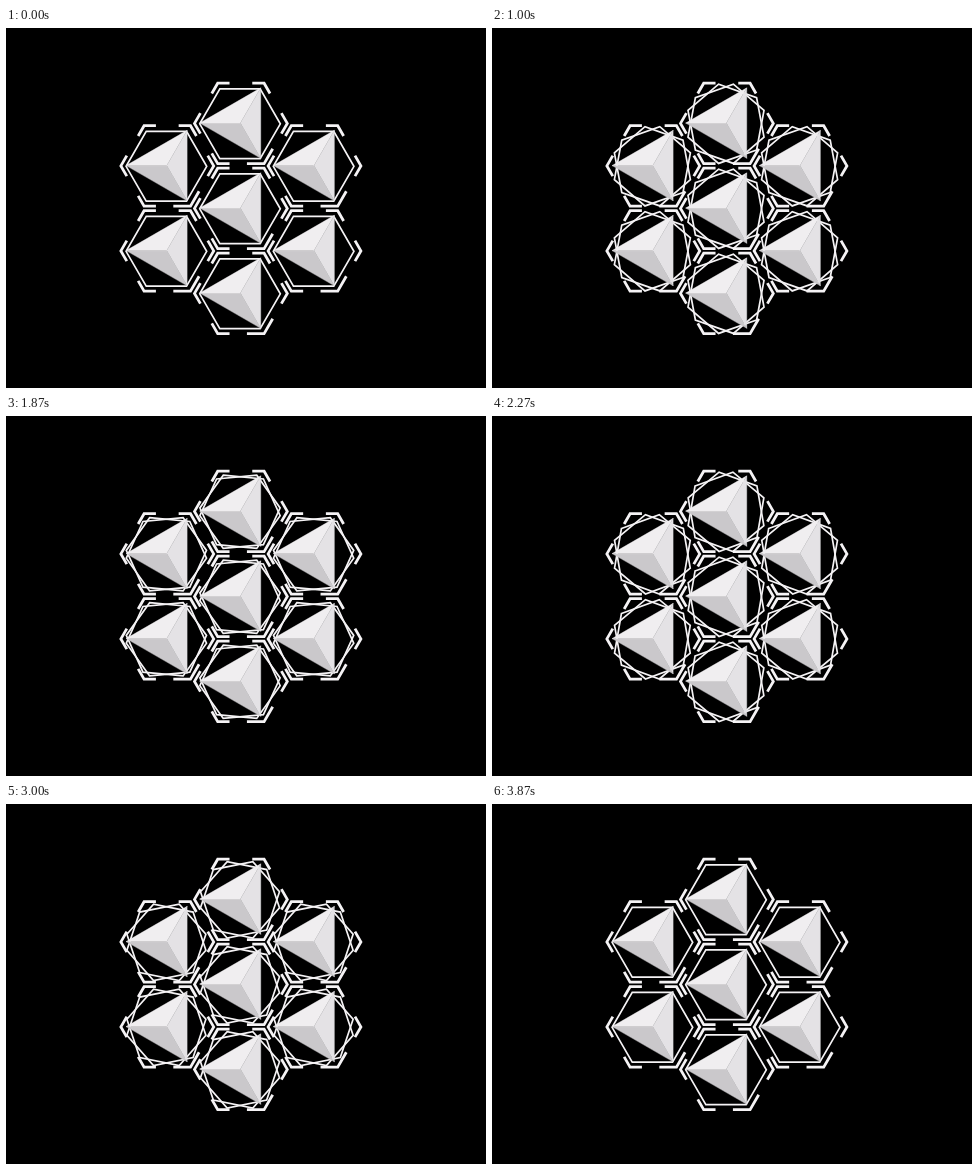
Write an HTML page with a canvas that moves like this. It is 480 px wide and 360 px high and loops after 4070 ms.

```html
<!DOCTYPE html>
<html lang="en">
<head>
<meta charset="utf-8">
<title>Rotating hexagons</title>
<style>
  html, body { margin: 0; width: 100%; height: 100%; overflow: hidden; background: #000; }
  canvas { display: block; width: 480px; height: 360px; }
</style>
</head>
<body>
<canvas id="stage" width="480" height="360"></canvas>
<script>
const ctx = document.getElementById("stage").getContext("2d");
const LOOP = 4070, FPS = 15, MOVE_STEPS = 60;
const SPACING = 85;
const BRACKETS = { x: 234.9, y: 180.4, r: 46.4, arm: 0.255, longArm: 0.37 };
const HEX = { x: 234, y: 180.8, r: 40.3 };
const PYRAMID = { x: 234.4, y: 180.1, r: 40.7 };
const LINE = "#f5f3f5";
const FACES = ["#cac8cb", "#f0eef0", "#e4e2e5"];

const polar = (r, deg) => {
  const a = deg * Math.PI / 180;
  return [r * Math.cos(a), r * Math.sin(a)];
};
const mix = (p, q, k) => [p[0] + (q[0] - p[0]) * k, p[1] + (q[1] - p[1]) * k];

const cells = [[0, 0]];
for (let i = 0; i < 6; i++) cells.push(polar(SPACING, 30 + 60 * i));

function trace(points, closed) {
  ctx.beginPath();
  points.forEach(p => ctx.lineTo(...p));
  if (closed) ctx.closePath();
}

function hexagon(turn) {
  trace([0, 1, 2, 3, 4, 5].map(i => polar(HEX.r, turn + 60 * i)), true);
  ctx.lineWidth = 1.7;
  ctx.stroke();
}

// the lower right bracket has longer arms
function brackets() {
  ctx.lineWidth = 2.8;
  for (let a = 0; a < 360; a += 60) {
    const corner = polar(BRACKETS.r, a);
    const length = a === 60 ? BRACKETS.longArm : BRACKETS.arm;
    const arm = side => mix(corner, polar(BRACKETS.r, a + side), length);
    trace([arm(-60), corner, arm(60)]);
    ctx.stroke();
  }
}

function pyramid() {
  FACES.forEach((color, i) => {
    const a = 60 + 120 * i;
    trace([[0, 0], polar(PYRAMID.r, a), polar(PYRAMID.r, a + 120)], true);
    ctx.fillStyle = color;
    ctx.fill();
    // hairline in the face color closes the seam between faces
    ctx.strokeStyle = color;
    ctx.lineWidth = 0.4;
    ctx.stroke();
  });
}

// cubic-bezier(.333, 0, .375, 1)
function ease(x) {
  const curve = (u, a, b) => 3 * a * u * (1 - u) ** 2 + 3 * b * u * u * (1 - u) + u ** 3;
  let lo = 0, hi = 1;
  for (let i = 0; i < 30; i++) {
    const mid = (lo + hi) / 2;
    if (curve(mid, 0.333, 0.375) < x) lo = mid; else hi = mid;
  }
  return curve(lo, 0, 1);
}

function place(part, cell, paint) {
  ctx.save();
  ctx.translate(part.x + cell[0], part.y + cell[1]);
  ctx.strokeStyle = LINE;
  paint();
  ctx.restore();
}

function draw(time) {
  const step = Math.floor((time % LOOP + 4) * FPS / 1000);
  const moving = step >= 2 && step < MOVE_STEPS - 2;
  const turn = moving ? 180 * ease(step / MOVE_STEPS) : 0;
  ctx.fillStyle = "#000";
  ctx.fillRect(0, 0, 480, 360);
  for (const cell of cells) {
    place(BRACKETS, cell, brackets);
    place(HEX, cell, () => {
      hexagon(turn);
      if (moving) hexagon(-turn);
    });
    place(PYRAMID, cell, pyramid);
  }
}

const start = performance.now();
function tick() {
  draw(performance.now() - start);
  requestAnimationFrame(tick);
}
tick();
</script>
</body>
</html>
```
